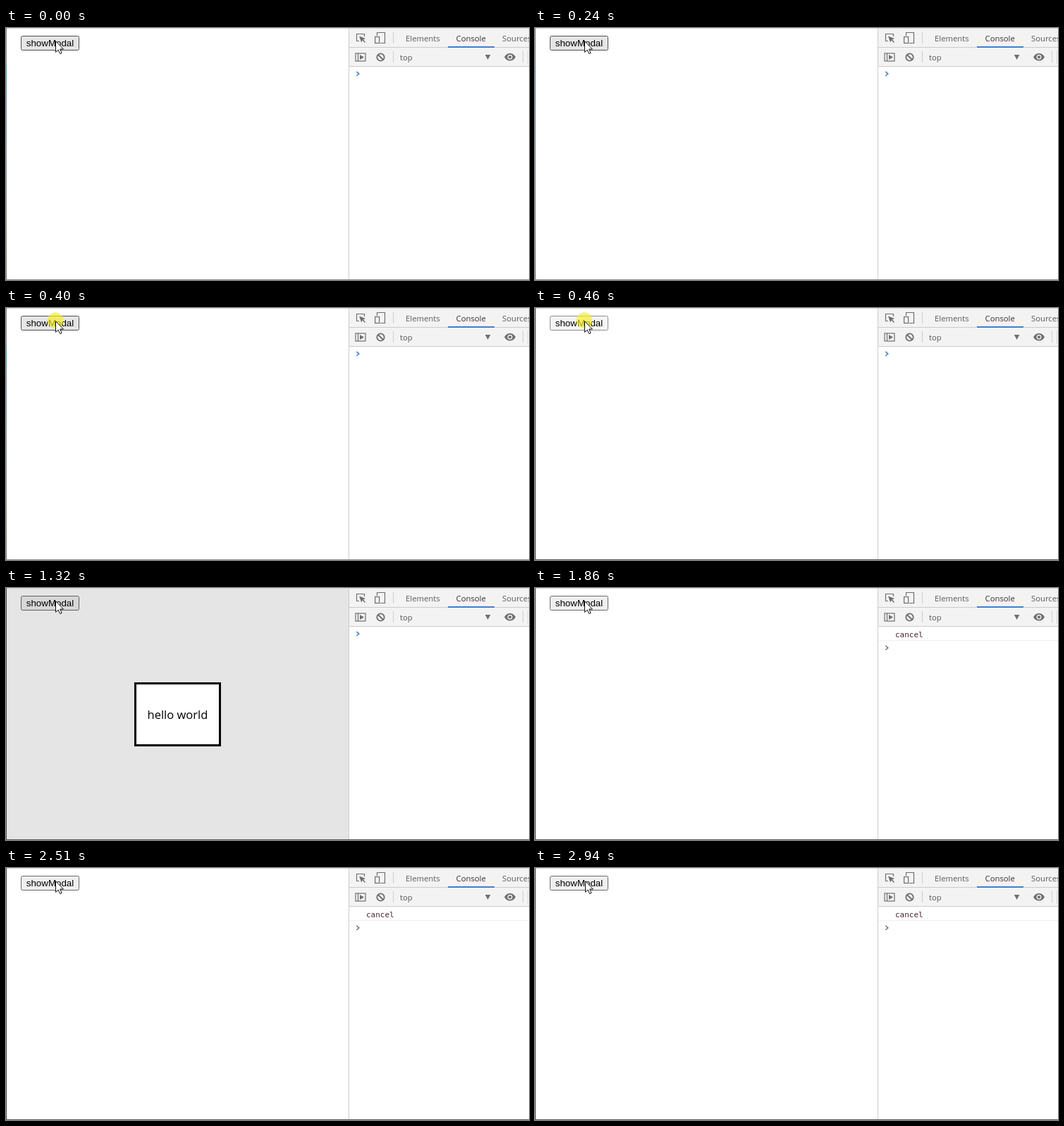
These frames come from a looping animation (742 by 358 pixels, 3010 ms). An HTML page:

```html
<!DOCTYPE html>
<html lang="en">
<head>
<meta charset="utf-8">
<title>showModal demo</title>
<style>
  html, body { margin: 0; width: 100%; height: 100%; overflow: hidden; background: #fff; }
  svg { display: block; }
  .ui { font-family: "Open Sans", "Noto Sans", sans-serif; font-size: 11.3px; fill: #5a5a5a; }
  .btn { font-family: "Liberation Sans", Arial, sans-serif; font-size: 13.333px; }
  .mono { font-family: "DejaVu Sans Mono", monospace; font-size: 11px; fill: #4b2233; }
  .line { fill: none; stroke: #ccc; }
  .icon { fill: none; stroke: #6e6e6e; stroke-width: 1.2; }
  .solid { fill: #6e6e6e; }
</style>
</head>
<body>
<svg width="742" height="358" viewBox="0 0 742 358">
  <defs>
    <linearGradient id="edge" x1="0" y1="0" x2="0" y2="1">
      <stop offset="0" stop-color="#8a8a8a"/>
      <stop offset=".12" stop-color="#8a8f94"/>
      <stop offset=".16" stop-color="#5f93b4"/>
      <stop offset=".5" stop-color="#7b97a6"/>
      <stop offset=".8" stop-color="#948b78"/>
      <stop offset="1" stop-color="#7c7871"/>
    </linearGradient>
  </defs>
  <rect width="742" height="358" fill="#fff"/>

  <!-- page -->
  <rect id="button" x="21.5" y="11.5" width="82" height="20" rx="2"/>
  <text class="btn" x="28.8" y="26">showModal</text>
  <g id="modal">
    <rect x="1" y="1" width="485" height="356" fill="#000" opacity=".1"/>
    <rect x="183.5" y="135.5" width="120" height="88" fill="#fff" stroke="#000" stroke-width="3"/>
    <text class="ui" x="200.5" y="186" style="font-size:16.5px;fill:#000">hello world</text>
  </g>

  <!-- tools panel -->
  <rect x="487" y="1" width="255" height="53" fill="#f3f3f3"/>
  <path class="line" d="M486.5 1V357M487 27.5H742M487 54.5H742M549.5 6V22M549.5 33V49M733.5 33V49"/>
  <path d="M740.5 32V51" stroke="#d8d8d8"/>
  <rect x="741" y="32" width="1" height="19" fill="#fff"/>
  <rect x="627" y="26" width="66" height="2" fill="#3b82c8"/>
  <text class="ui" x="567" y="19">Elements</text>
  <text class="ui" x="638.5" y="19" style="fill:#333">Console</text>
  <text class="ui" x="704" y="19">Sources</text>
  <text class="ui" x="559" y="46">top</text>

  <path class="icon" d="M501 18.5H497.5V8.5H508.5V12"/>
  <path class="solid" d="M501 11.5L510 15L506.8 16.4L510 19.7L508.8 20.8L505.6 17.6L504.2 20.6Z"/>
  <path class="icon" d="M526.5 11V6.5H537.5V21.5H531"/>
  <rect class="icon" x="523.6" y="12.5" width="6" height="9"/>
  <rect class="icon" x="496" y="36" width="14" height="11"/>
  <path class="icon" d="M499.5 36V47"/>
  <path class="solid" d="M502 38L508 41.5L502 45Z"/>
  <g class="icon" stroke-width="2" style="stroke-width:1.8">
    <circle cx="531.5" cy="41.5" r="5.2"/>
    <path d="M528 38L535 45"/>
  </g>
  <path class="solid" d="M679.8 38H687.4L683.6 45Z"/>
  <path class="solid" d="M707 41.3Q710 36 715 36T723 41.3Q720 46.6 715 46.6T707 41.3Z"/>
  <circle cx="715" cy="41.3" r="3.5" fill="#f3f3f3"/>
  <circle class="solid" cx="715" cy="41.3" r="2.1"/>

  <!-- console -->
  <g id="log">
    <text class="mono" x="511" y="70">cancel</text>
    <path d="M487 74.5H742" stroke="#f0f0f0"/>
  </g>
  <path id="prompt" d="M497.3 -3L500.8 0L497.3 3" fill="none" stroke-width="1.5"/>

  <!-- window frame -->
  <rect width="742" height="1" fill="#d4d4d4"/>
  <rect id="left" width="1" height="358"/>
  <rect id="bottom" y="357" width="742" height="1"/>

  <circle id="click" cx="70" cy="17.5" r="11.3" fill="#f7ee26" opacity=".68"/>
  <path id="cursor" d="M.5 .7V16.4L4.1 13L6.6 18.6L9.1 17.5L6.7 12H11.4Z" fill="#fff" stroke="#111" stroke-linejoin="round"/>
</svg>
<script>
  const LOOP = 3010;
  const hover = { fill: "#e5e5e5", border: "#4f4f4f" };
  const active = { fill: "#f5f5f5", border: "#8d8d8d" };
  const rest = { fill: "#efefef", border: "#696969" };
  const steps = [
    { at: 0, button: hover, soft: true },
    { at: 400, button: hover, soft: true, click: true },
    { at: 460, button: active, click: true },
    { at: 520, button: rest, modal: true },
    { at: 1860, button: rest, log: true },
    { at: 2940, button: rest, log: true, shift: 1 }
  ];
  const el = id => document.getElementById(id);
  const set = (id, attrs) => {
    for (const key in attrs) el(id).setAttribute(key, attrs[key]);
  };
  const show = (id, on) => set(id, { visibility: on ? "visible" : "hidden" });

  function draw(step) {
    set("button", { fill: step.button.fill, stroke: step.button.border });
    set("left", { fill: step.soft ? "url(#edge)" : "#4c4f54" });
    set("bottom", { fill: step.soft ? "#8c8c8c" : "#5a5a5a" });
    set("prompt", {
      transform: `translate(0 ${step.log ? 85 : 65})`,
      stroke: step.log ? "#6e6e6e" : "#367cc0"
    });
    set("cursor", { transform: `translate(${70 + (step.shift || 0)} 18)` });
    show("click", step.click);
    show("modal", step.modal);
    show("log", step.log);
  }

  let current;
  const start = performance.now();
  function tick() {
    const t = (performance.now() - start) % LOOP;
    const step = steps.filter(s => s.at <= t).pop();
    if (step !== current) draw(current = step);
    requestAnimationFrame(tick);
  }
  tick();
</script>
</body>
</html>
```
